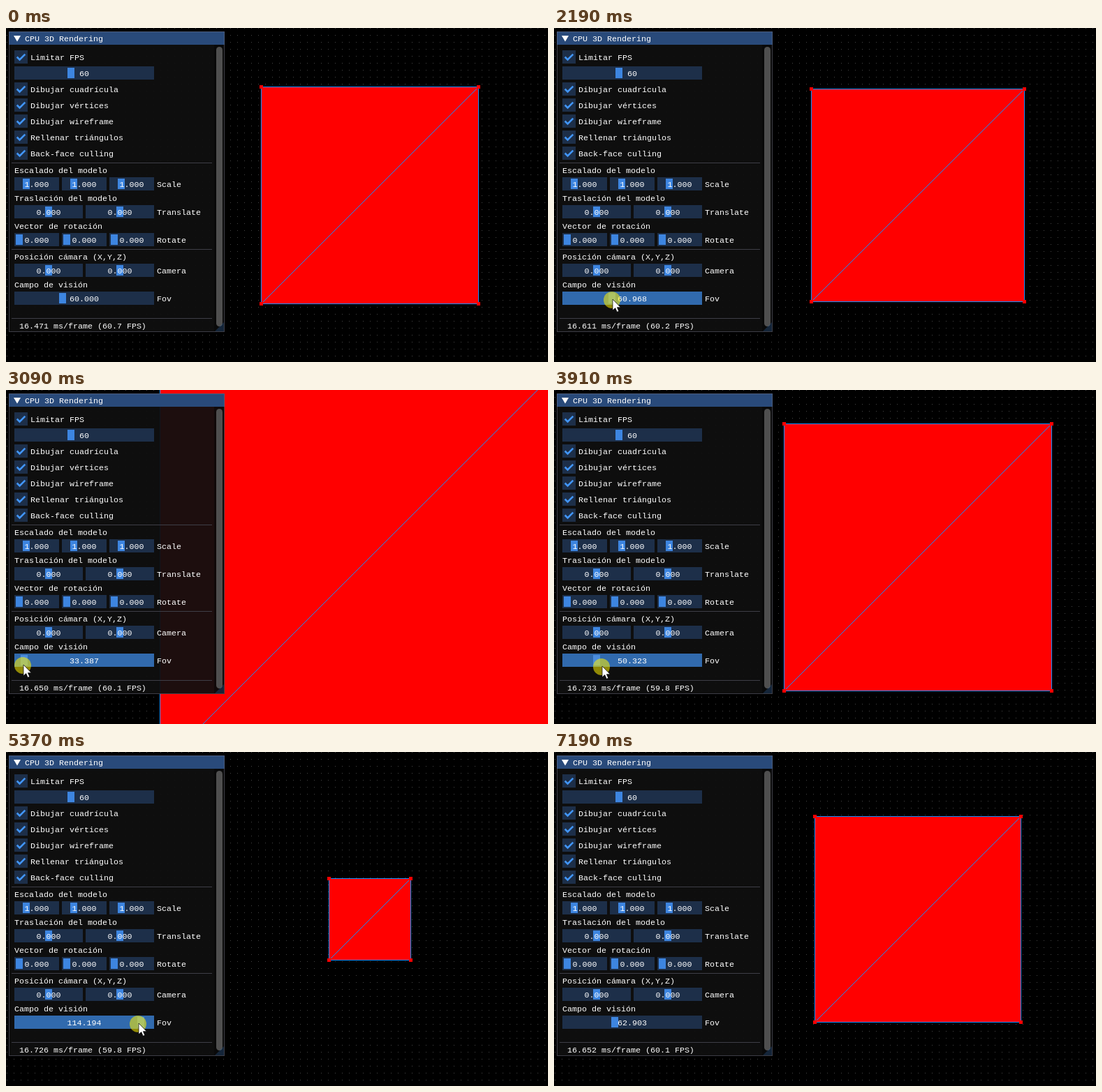
Animation of 776 by 479 pixels, one loop 7280 ms. Source, as an HTML page:

```html
<!DOCTYPE html>
<html lang="es">
<head>
<meta charset="utf-8">
<title>CPU 3D Rendering</title>
<style>
  html, body { margin: 0; width: 100%; height: 100%; overflow: hidden; background: #000; }
  svg { display: block; width: 100%; height: 100%; }
  text { font: 11.66px "Liberation Mono", monospace; fill: #fff; white-space: pre; }
  .crisp { shape-rendering: crispEdges; }
  .wire { fill: none; stroke: #1190ff; stroke-width: 1; }
  .frame { fill: #1d2f49; }
  .frame.hover { fill: #23456d; }
  .frame.active { fill: #316aad; }
  .grab { fill: #3d85e0; }
  .active + .grab { fill: #4a8cdc; }
  .check { fill: none; stroke: #4296fa; stroke-width: 2.6; }
  .rule { fill: #3e3e47; }
</style>
</head>
<body>
<svg viewBox="0 0 776 479">
  <defs>
    <pattern id="dots" width="10" height="10" patternUnits="userSpaceOnUse">
      <rect x="1" width="1" height="1" fill="#444"/>
    </pattern>
  </defs>
  <rect width="776" height="479"/>
  <rect class="crisp" width="776" height="479" fill="url(#dots)"/>

  <g class="crisp">
    <path id="face" fill="#f00"/>
    <path id="wire" class="wire"/>
    <path id="corners" fill="#f00"/>
  </g>

  <g id="panel">
    <rect class="crisp" x="4" y="5" width="309" height="431" fill="#0f0f0f" fill-opacity=".94"/>
    <rect class="crisp" x="4" y="5" width="309" height="19" fill="#294a7a"/>
    <path d="M11 11H21L16 19.5Z" fill="#fff"/>
    <rect class="crisp" x="298" y="24" width="14" height="411" fill="#050505" fill-opacity=".53"/>
    <rect x="301" y="27" width="9" height="401" rx="4.5" fill="#4f4f4f"/>
    <path d="M312 422V435H299Z" fill="#4296fa" fill-opacity=".2"/>
    <rect class="crisp" x="4.5" y="5.5" width="308" height="430" fill="none" stroke="#6e6e80" stroke-opacity=".5"/>
  </g>

  <g id="cursor">
    <circle id="press" cy="1" r="12" fill="#fff000" fill-opacity=".55"/>
    <path d="M1 0V16L4.7 12.6 7.2 18.3 9.8 17.2 7.4 11.7H12.3Z" fill="#fff" stroke="#000" stroke-width=".7"/>
  </g>
</svg>
<script>
const LOOP = 7280, LAST_STEP = 88;
const ENTER = 10, PRESS = 23, RELEASE = 79, LEAVE = 82;
const LEFT = 12, WIDTH = 200, GAP = 4, ROW = 23;
const $ = id => document.getElementById(id);
const panel = $("panel");

function add(tag, attrs, content) {
  const el = document.createElementNS("http://www.w3.org/2000/svg", tag);
  for (const name in attrs) el.setAttribute(name, attrs[name]);
  if (content) el.textContent = content;
  return panel.appendChild(el);
}

// y is the middle of the line
const label = (x, y, content) => add("text", { x, y: y + 4 }, content);

const rule = y => add("rect", { class: "rule crisp", x: 8, y, width: 287, height: 1 });

function checkbox(y, name) {
  add("rect", { class: "frame crisp", x: LEFT, y, width: 19, height: 19 });
  add("path", { class: "check", d: `M15.65 ${y + 9.5}l3.9 3.9 7.8-7.8` });
  label(35, y + 10, name);
}

function slider(x, y, width, grabOffset, value) {
  const frame = add("rect", { class: "frame crisp", x, y, width, height: 19 });
  const grab = add("rect", { class: "grab crisp", x: x + grabOffset, y: y + 2, width: 10, height: 15 });
  const text = label(x + width / 2, y + 10, value);
  text.setAttribute("text-anchor", "middle");
  return { frame, grab, text };
}

// A heading above a row of equal sliders; returns the last one
function group(y, heading, name, count, grabOffset, value) {
  const width = (WIDTH - GAP * (count - 1)) / count;
  let last;
  label(LEFT, y, heading);
  for (let i = 0; i < count; i++)
    last = slider(LEFT + i * (width + GAP), y + 10, width, grabOffset, value);
  label(LEFT + WIDTH + GAP, y + 20, name);
  return last;
}

label(27, 15, "CPU 3D Rendering");
checkbox(32, "Limitar FPS");
slider(LEFT, 32 + ROW, WIDTH, 76, "60");
["Dibujar cuadrícula", "Dibujar vértices", "Dibujar wireframe", "Rellenar triángulos", "Back-face culling"]
  .forEach((name, i) => checkbox(32 + ROW * (i + 2), name));
rule(193);
group(204, "Escalado del modelo", "Scale", 3, 12, "1.000");
group(244, "Traslación del modelo", "Translate", 2, 44, "0.000");
group(284, "Vector de rotación", "Rotate", 3, 2, "0.000");
rule(317);
group(328, "Posición cámara (X,Y,Z)", "Camera", 2, 44, "0.000");
const fovSlider = group(368, "Campo de visión", "Fov", 1, 64, "60.000");
rule(416);
const stats = label(19, 427, "");

// Turning and passing points of the pointer: step, x, y
const path = [
  [ENTER, 118, 438], [19, 83, 389], [28, 83, 389], [40.7, 18, 395], [46, 36, 396],
  [52, 121, 396], [62, 204, 389], [66, 193, 389], [73, 109, 396], [78, 87, 396], [81, 87, 413]
];

// Step, milliseconds per rendered frame
const load = [[0, 16.471], [27, 16.611], [38, 16.65], [52, 16.748], [66, 16.726], [73, 16.622], [88, 16.652]];

// Cubic through the points, flat at turning points
function smooth(points, col, s) {
  const slope = i => {
    const p = points[i - 1], k = points[i], n = points[i + 1];
    if (!p || !n || (k[col] - p[col]) * (n[col] - k[col]) <= 0) return 0;
    return (n[col] - p[col]) / (n[0] - p[0]);
  };
  let i = 0;
  while (i < points.length - 2 && s >= points[i + 1][0]) i++;
  const [a, b] = [points[i], points[i + 1]], span = b[0] - a[0];
  const u = Math.min(1, Math.max(0, (s - a[0]) / span)), v = 1 - u;
  return a[col] * v * v * (1 + 2 * u) + b[col] * u * u * (3 - 2 * u)
    + span * u * v * (slope(i) * v - slope(i + 1) * u);
}

// The picture advances about twelve times a second
function stepAt(t) {
  const s = t < 1530 ? t / 80.5 + 0.1 : 19.25 + (t - 1530) / 82.06;
  return Math.min(LAST_STEP, Math.floor(s));
}

function drawModel(fov) {
  const half = 90 / Math.tan(fov * Math.PI / 360);
  const [l, r, t, b] = [521 - half, 521 + half, 240 - half, 240 + half].map(Math.floor);
  $("face").setAttribute("d", `M${l} ${t}H${r + 1}V${b + 1}H${l}Z`);
  $("wire").setAttribute("d",
    `M${l + .5} ${b + .5}V${t + .5}H${r + .5}V${b + .5}H${l + .5}L${r + .5} ${t + .5}`);
  $("corners").setAttribute("d",
    [[l, t], [r, t], [l, b], [r, b]].map(([x, y]) => `M${x - 2} ${y - 2}h5v5h-5z`).join(""));
}

function draw(s) {
  const shown = s >= ENTER && s < LEAVE, pressed = s >= PRESS && s < RELEASE;
  const grabX = s < PRESS ? 81 : Math.max(19, Math.round(smooth(path, 1, s)));
  const fov = 30 + (grabX - 19) * 90 / 186;
  // The slider lags a little behind the pointer
  const x = Math.round(smooth(path, 1, s + 0.4)), y = Math.round(smooth(path, 2, s));
  const state = pressed ? "active" : shown && y < 398 ? "hover" : "";

  drawModel(fov);
  fovSlider.frame.setAttribute("class", `frame crisp ${state}`);
  fovSlider.grab.setAttribute("x", grabX - 5);
  fovSlider.text.textContent = fov.toFixed(3);

  const ms = smooth(load, 1, s);
  stats.textContent = `${ms.toFixed(3)} ms/frame (${(1000 / ms).toFixed(1)} FPS)`;

  $("cursor").setAttribute("transform", `translate(${x} ${y})`);
  $("cursor").setAttribute("visibility", shown ? "visible" : "hidden");
  $("press").setAttribute("display", pressed ? "inline" : "none");
}

function tick() {
  draw(stepAt(performance.now() % LOOP));
  requestAnimationFrame(tick);
}
tick();
</script>
</body>
</html>
```
